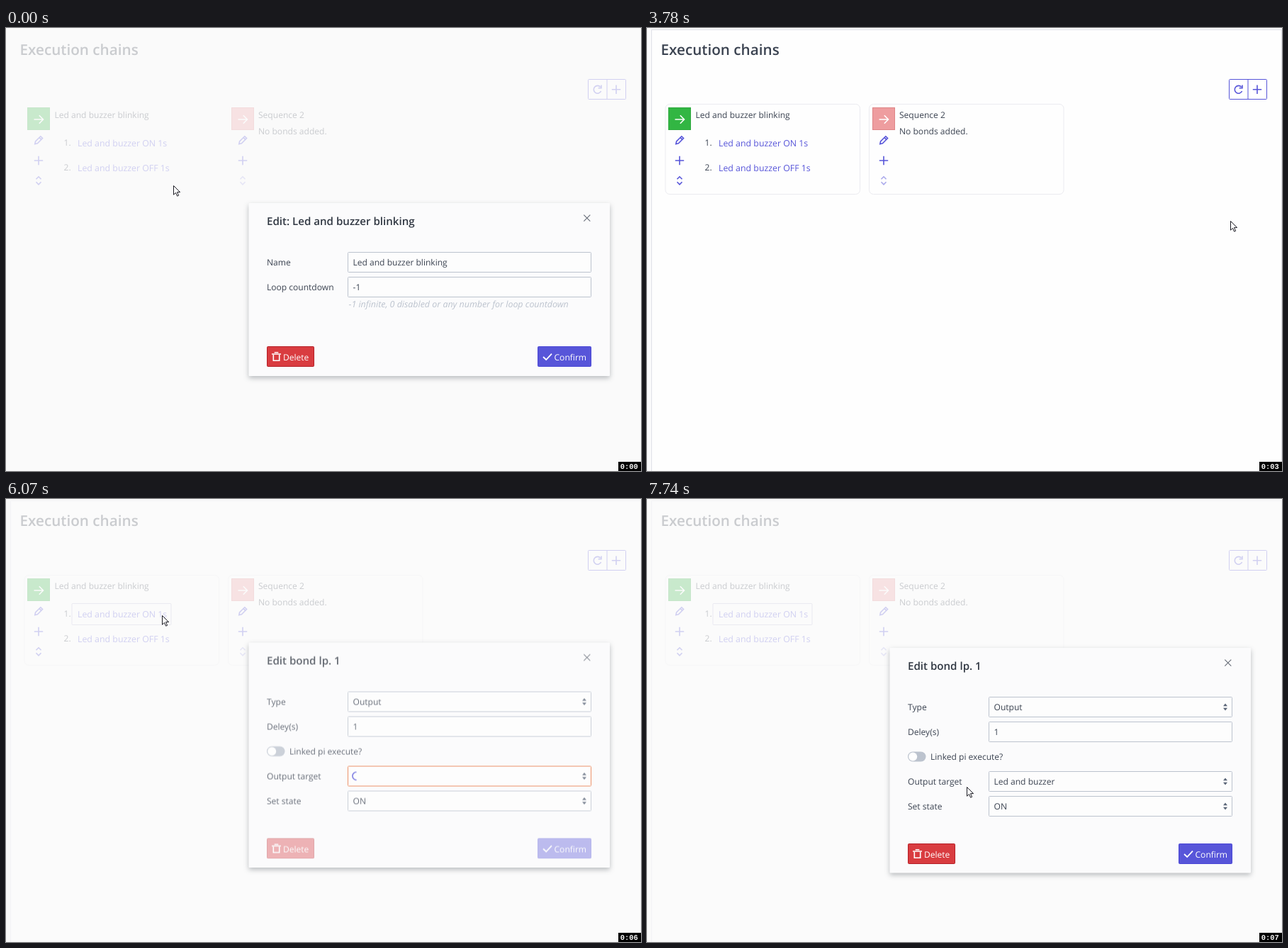
These frames come from a looping animation (896x625 px, 8 s). An HTML page:

```html
<!DOCTYPE html>
<html lang="en">
<head>
<meta charset="utf-8">
<title>Execution chains</title>
<style>
html, body { margin: 0; height: 100%; overflow: hidden; background: #fbfbfb; }
svg { display: block; width: 100vw; height: 100vh; }
text { font: 12.05px "Open Sans", "Noto Sans", sans-serif; fill: #3b4351; white-space: pre; text-rendering: geometricPrecision; }
.h1 { font-size: 20.7px; font-weight: 600; }
.h2 { font-size: 15.1px; font-weight: 600; fill: #303742; }
.hint { font-size: 12.45px; font-style: italic; fill: #bcc3ce; }
.link { font-size: 12.35px; fill: #5755d9; }
.white { fill: #fff; }
.clock { font: bold 10.4px "Liberation Mono", monospace; fill: #fff; }
.icon { fill: none; stroke: #5755d9; stroke-width: 1.6; }
.wicon { fill: none; stroke: #fff; stroke-width: 1.6; }
.card { fill: none; stroke: #ebebf0; }
.box { fill: #fff; fill-opacity: .6; stroke: #bcc3ce; }
.sheet { fill: #fbfbfc; filter: drop-shadow(0 3px 3.8px rgba(48, 55, 66, .32)); }
.close { fill: none; stroke: #666c77; stroke-width: 1.1; }
.tri { fill: #5b6678; }
.cursor { fill: #fff; stroke: #1c1c24; stroke-linejoin: round; }
.beam { fill: none; stroke: #333; }
</style>
</head>
<body>
<svg id="stage" viewBox="0 0 896 625"></svg>
<script>
const text = (x, y, s, cls = '', id = '') => `<text x="${x}" y="${y}" class="${cls}" id="${id}">${s}</text>`;
const rect = (x, y, w, h, attrs) => `<rect x="${x}" y="${y}" width="${w}" height="${h}" ${attrs}/>`;
const path = (d, cls, attrs = '') => `<path d="${d}" class="${cls}" ${attrs}/>`;
const group = (attrs, ...parts) => `<g ${attrs}>${parts.join('')}</g>`;

// Square run button with its column of tools
const tools = (x, fill, edge, dim) => group(`transform="translate(${x} 0)"`,
  rect(.5, 112.5, 31, 31, `fill="${fill}" stroke="${edge}"`),
  path('M9.5 129H22M16.8 123.3L22.5 129L16.8 134.7', 'wicon'),
  path('M10.8 163.6L11.6 160L18.8 152.8L21.6 155.6L14.4 162.8ZM17 154.6L19.8 157.4', 'icon'),
  path('M9.8 187H22.2M16 180.8V193.2', 'icon'),
  path('M12.5 213.3L16 209.8L19.5 213.3M12.5 217.3L16 220.8L19.5 217.3', 'icon', `opacity="${dim}"`));

const page = group('',
  group('id="frames"',
    rect(6.5, 2.5, 889, 640, 'fill="#fefefe" stroke="#e0e1e8"'),
    rect(26, 107.5, 274.5, 127, 'rx="6" class="card"'),
    rect(313.5, 107.5, 274.5, 127, 'rx="6" class="card"')),
  text(19.5, 38, 'Execution chains', 'h1'),
  rect(821.5, 72.5, 53, 28, 'rx="1" fill="#fff" stroke="#5755d9"'),
  path('M848 72.5V100.5', 'icon', 'style="stroke-width:1"'),
  path('M838.8 83.3A5.4 5.4 0 1 0 839.6 89M840 80.5V84.8H835.6', 'icon'),
  path('M854.8 86.7H867.2M861 80.5V92.9', 'icon'),
  tools(30, '#32b643', '#2faa3f', 1),
  tools(318, '#ee9d9f', '#df8587', .5),
  text(68.5, 127, 'Led and buzzer blinking'),
  text(356, 127, 'Sequence 2'),
  text(356, 150, 'No bonds added.'),
  rect(93, 147.5, 140, 30, 'id="focus" rx="1" fill="none" stroke="#bdbcd6"'),
  text(81.5, 166, '1.'),
  text(101, 167, 'Led and buzzer ON 1s', 'link', 'link'),
  text(81.5, 201, '2.'),
  text(101, 202, 'Led and buzzer OFF 1s', 'link'));

// Dialog parts use a y axis that starts at the dialog's top
const row = (y, label, value, id = '') =>
  text(368, y + 19, label) + rect(482.5, y + .5, 343, 28, `class="box" rx="1" id="${id}Box"`) +
  text(489.5, y + 19, value, '', id + 'Value');
const arrows = (x, y) => path(`M${x - 3} ${y - 1.3}h6l-3 -3.6zM${x - 3} ${y + 1.3}h6l-3 3.6z`, 'tri');
const buttons = (y, id) => group(`id="${id}" transform="translate(0 ${y})"`,
  rect(368.5, .5, 66, 28, 'rx="1" fill="#d93c40" stroke="#b51f27"'),
  path('M375 11H388M378.7 8.8H384.3M377.3 12V20.2H385.7V12', 'wicon'),
  text(391, 19.5, 'Delete', 'white'),
  rect(750.5, .5, 75, 28, 'rx="1" fill="#5755d9" stroke="#4b48d6"'),
  path('M758 15L762.2 19L770 10.6', 'wicon', 'style="stroke-width:1.8"'),
  text(773.5, 19.5, 'Confirm', 'white'));
const dialog = (id, h, title, ...parts) => group(`id="${id}"`,
  rect(342.5, 0, 509.5, h, 'rx="1" class="sheet"'),
  group(`id="${id}Body"`,
    text(368, 31, title, 'h2'),
    path('M815.3 16.7L824.3 25.7M824.3 16.7L815.3 25.7', 'close'),
    ...parts));

const chainDialog = dialog('chain', 244, 'Edit: Led and buzzer blinking',
  row(69, 'Name', 'Led and buzzer blinking'),
  row(104, 'Loop countdown', '-1'),
  text(483.5, 147, '-1 infinite, 0 disabled or any number for loop countdown', 'hint'),
  buttons(202, 'chainButtons'));

const bondDialog = dialog('bond', 317.5, 'Edit bond lp. 1',
  row(69, 'Type', 'Output'), arrows(816, 83.5),
  row(104, 'Deley(s)', '1'),
  group('id="stepper"', rect(807, 111, 12, 15, 'fill="#efefef"'), arrows(813, 118)),
  rect(368, 146.5, 25.5, 14, 'rx="7" fill="#bcc3ce"'),
  '<circle cx="375.2" cy="153.5" r="6" fill="#fff"/>',
  text(400, 158, 'Linked pi execute?'),
  row(174, 'Output target', 'Led and buzzer', 'target'), arrows(816, 188.5),
  path('M0 -5.6A5.6 5.6 0 0 0 0 5.6', 'icon', 'id="spinner"'),
  row(209, 'Set state', 'ON'), arrows(816, 223.5),
  buttons(276, 'bondButtons'));

const cursors = group('id="pointer"',
  path('M.5 .5V13.2L3.5 10.4L5.6 15.2L7.6 14.3L5.5 9.6H9.6Z', 'cursor', 'id="arrow"'),
  path('M4.5 11.5V1.8Q4.5 .5 5.7 .5T7 1.8V7.5Q8.8 6.5 9.3 8Q11.1 7.4 11.5 8.7Q13.4 8.3 13.5 10V14Q13.2 16 12 17.3V18.8H5.5V17L1 11.5Q.4 10.2 1.6 9.7Q2.8 9.4 4.5 11.5Z', 'cursor', 'id="hand"'),
  path('M0 .5H6M3 .5V12.5M0 12.5H6', 'beam', 'id="beam"'));

document.getElementById('stage').innerHTML = [
  rect(0, 0, 896, 625, 'fill="#fafafb"'), page,
  rect(0, 0, 896, 625, 'id="veil" fill="#fafafa" fill-opacity=".75"'),
  chainDialog, bondDialog, cursors,
  rect(864, 612, 32, 13, 'fill="#000"'), text(866.8, 622, '0:00', 'clock', 'clock')
].join('');

const $ = id => document.getElementById(id);
const show = (id, on) => $(id).style.display = on ? '' : 'none';
const move = (id, x, y, turn = 0) => $(id).setAttribute('transform', `translate(${x} ${y}) rotate(${turn})`);

// The screen is sampled in steps: start time, pointer shape, x, y
const steps = [
  [0, 'arrow', 236, 222], [250, 'arrow', 383, 288], [520, 'arrow', 432, 315],
  [770, 'arrow', 565, 383], [1120, 'beam', 707, 373], [1370, 'beam', 819, 331],
  [1640, 'arrow', 835, 304], [1890, 'arrow', 830, 284], [2240, 'arrow', 822, 272],
  [2510, 'hand', 818, 272], [3780, 'arrow', 823, 272], [4060, 'arrow', 816, 272],
  [4430, 'arrow', 634, 272], [4680, 'arrow', 490, 281], [4930, 'arrow', 301, 257],
  [5200, 'arrow', 255, 181], [5550, 'hand', 216, 163], [6070, 'arrow', 220, 164],
  [6320, 'arrow', 314, 214], [6600, 'arrow', 436, 309], [6850, 'arrow', 443, 328],
  [7120, 'arrow', 445, 365], [7470, 'arrow', 447, 390], [7740, 'arrow', 451, 406]
];
const ticks = [870, 1990, 3010, 4160, 5300, 6070, 7220];
const CLOSE = 3780, OPEN = 6070, SETTLED = 6320, LOADED = 6850, READY = 7120;

function draw(t) {
  const [start, shape, x, y] = steps.filter(s => s[0] <= t).pop();
  for (const id of ['arrow', 'hand', 'beam']) show(id, id === shape);
  move('pointer', x, y);
  $('clock').textContent = '0:0' + ticks.filter(s => s <= t).length;

  show('frames', t >= CLOSE);
  show('veil', t < CLOSE || t >= OPEN);
  show('chain', t < CLOSE);
  move('chain', 0, 247);
  show('focus', t >= OPEN);
  $('link').style.fill = shape === 'hand' && t > CLOSE ? '#4240d4' : '';

  show('bond', t >= OPEN);
  move('bond', 0, t < SETTLED ? 202.5 : 210);
  $('bondBody').style.opacity = t < SETTLED ? .75 : 1;
  $('bondButtons').style.opacity = t < READY ? .5 : 1;
  show('stepper', t >= LOADED && t < READY);
  show('targetValue', t >= LOADED);
  $('targetBox').style.stroke = t < LOADED ? '#e8703a' : '';
  show('spinner', t < READY);
  move('spinner', 494.5, 188.3, (start - OPEN) * .75);
}

function loop(now) {
  draw(now % 8000);
  requestAnimationFrame(loop);
}
draw(0);
requestAnimationFrame(loop);
</script>
</body>
</html>
```
